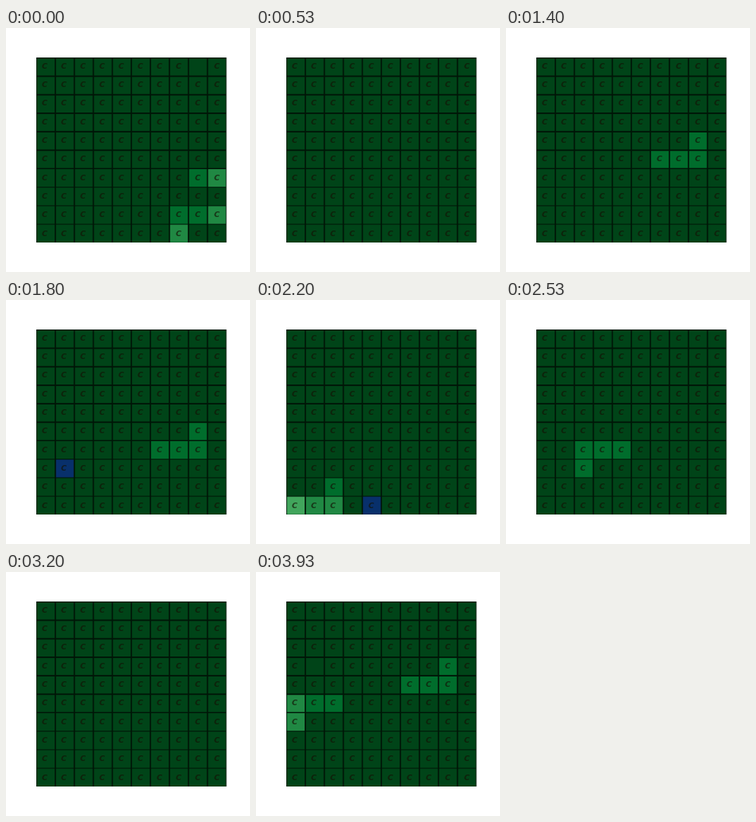
Animation, 306 px wide and 306 px high, one loop 3990 ms. Source, as an HTML page with a canvas:

```html
<!DOCTYPE html>
<html lang="en">
<head>
<meta charset="utf-8">
<title>Cell grid</title>
<style>
  html, body { margin: 0; width: 100%; height: 100%; overflow: hidden; background: #fff; }
  canvas { display: block; width: 100vw; height: 100vh; }
</style>
</head>
<body>
<canvas width="306" height="306"></canvas>
<script>
const ctx = document.querySelector('canvas').getContext('2d');
const N = 10, LOOP = 3990;
const GREENS = ['#004418', '#006d2c', '#208843', '#41a55c'];
const BLUE = '#08306b';
const colX = c => 38 + 23.85 * c;
const rowY = r => 37.3 + 23.2 * r;

// Each step: start time, then parts [kind, row, column].
// L: bar of three with a cell above its right end; U: the same turned by 180 degrees.
// B: blue cell; M: cell without its letter.
const SHAPES = {
  L: [[0, 0], [0, 1], [0, 2], [-1, 2]],
  U: [[0, 0], [0, 1], [0, 2], [1, 0]]
};
const STEPS = [
  [0, 'L68 U87 M08'],
  [200, 'L32 M75'],
  [330, 'L50 M93'],
  [400, 'U16 M02'],
  [530, ''],
  [930, 'L27'],
  [1000, 'L37'],
  [1130, 'L46'],
  [1200, 'L46 M78'],
  [1330, 'L56 M77'],
  [1400, 'L56'],
  [1530, 'L56 M24'],
  [1600, 'L66'],
  [1730, 'L66 M71'],
  [1800, 'L66 B71'],
  [1930, 'L81 B71'],
  [2000, 'L90'],
  [2130, 'L90 M94'],
  [2200, 'L90 B94'],
  [2330, 'U05 M94'],
  [2400, 'L61'],
  [2530, 'U62'],
  [2600, 'U73'],
  [2730, 'U73 M23'],
  [2800, 'U73 B23 M14'],
  [2930, 'U73 B14'],
  [3000, 'U84'],
  [3130, 'U84 M06'],
  [3200, ''],
  [3800, 'U80 M31'],
  [3930, 'L46 U50 M31']
];

const onEdge = i => i === 0 || i === N - 1;
const shade = (r, c) => GREENS[1 + onEdge(r) + onEdge(c)];

function readStep(parts) {
  const fills = {}, blank = {};
  for (const [kind, row, col] of parts.split(' ').filter(Boolean)) {
    const r = +row, c = +col;
    if (kind === 'M') blank[r * N + c] = true;
    else if (kind === 'B') fills[r * N + c] = BLUE;
    else for (const [dr, dc] of SHAPES[kind]) {
      const y = r + dr, x = c + dc;
      if (y >= 0 && y < N && x < N) fills[y * N + x] = shade(y, x);
    }
  }
  return { fills, blank };
}

function draw({ fills, blank }) {
  ctx.fillStyle = '#fff';
  ctx.fillRect(0, 0, 306, 306);
  ctx.fillStyle = '#001507';
  ctx.fillRect(38, 37, 238.5, 232);
  ctx.font = 'italic bold 9.5px "DejaVu Sans", sans-serif';
  ctx.textAlign = 'center';
  ctx.textBaseline = 'alphabetic';
  for (let r = 0; r < N; r++) {
    const gap = r < 6 ? 1.8 : 1;
    for (let c = 0; c < N; c++) {
      const id = r * N + c;
      ctx.fillStyle = fills[id] || GREENS[0];
      ctx.fillRect(colX(c) + 0.8, rowY(r) + gap / 2, 22.2, 23.2 - gap);
      if (blank[id]) continue;
      ctx.fillStyle = 'rgba(20, 20, 5, 0.72)';
      ctx.fillText('C', 48.6 + 24 * c, 50.8 + 23.3 * r);
    }
  }
}

function tick(now) {
  const t = now % LOOP;
  draw(readStep(STEPS.findLast(([start]) => start <= t)[1]));
  requestAnimationFrame(tick);
}
requestAnimationFrame(tick);
</script>
</body>
</html>
```
